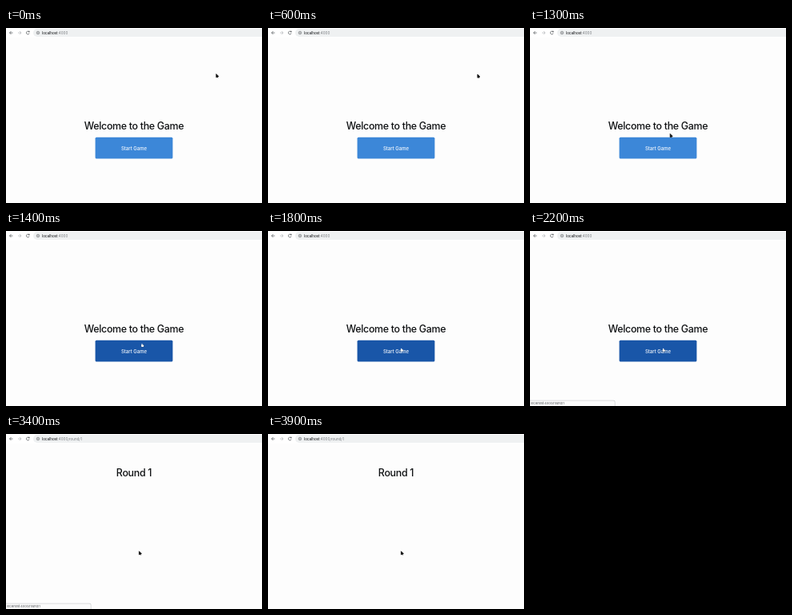
An HTML page with a canvas for the animation above (6.3 s loop, 320 by 219 pixels).

```html
<!DOCTYPE html>
<html lang="en">
<head>
<meta charset="utf-8">
<title>Start Game</title>
<style>
  html, body { margin: 0; width: 100%; height: 100%; overflow: hidden; background: #fdfdfd; }
  canvas { display: block; width: 320px; height: 219px; }
</style>
</head>
<body>
<canvas id="stage"></canvas>
<script>
const WIDTH = 320, HEIGHT = 219, LOOP = 6300, STEP = 100;
const CENTER = WIDTH / 2;
const MOVE = 600, HOVER = 1400, CLICK = 3300, NEXT_PAGE = 3400;
const canvas = document.getElementById('stage');
const ctx = canvas.getContext('2d');
const ratio = window.devicePixelRatio || 1;
canvas.width = WIDTH * ratio;
canvas.height = HEIGHT * ratio;

const clamp = v => Math.max(0, Math.min(1, v));
const mix = (a, b, p) => a + (b - a) * p;
const sigmoid = (time, middle) => 1 / (1 + Math.exp((middle - time) / 100));

// The vertical motion trails the horizontal one, bending the path.
function pointerAt(time) {
  const moving = time >= MOVE ? 1 : 0;
  return {
    x: mix(262.8, 166.4, moving * sigmoid(time, 1070)),
    y: mix(57.6, 146.8, moving * sigmoid(time, 1135))
  };
}

function text(value, x, y, size, color, { weight = 400, align = 'left', spacing = 0 } = {}) {
  ctx.font = `${weight} ${size}px Inter, sans-serif`;
  ctx.letterSpacing = `${spacing}px`;
  ctx.textAlign = align;
  ctx.fillStyle = color;
  ctx.fillText(value, x, y);
  return ctx.measureText(value).width;
}

function box(x, y, w, h, radius, fill) {
  ctx.beginPath();
  ctx.roundRect(x, y, w, h, radius);
  ctx.fillStyle = fill;
  ctx.fill();
}

function ring(x, y, radius, color, width, from = 0, to = Math.PI * 2) {
  ctx.beginPath();
  ctx.arc(x, y, radius, from, to);
  ctx.strokeStyle = color;
  ctx.lineWidth = width;
  ctx.stroke();
}

function navArrow(x, direction, color) {
  const y = 6, reach = 2 * direction;
  ctx.beginPath();
  ctx.moveTo(x - reach, y);
  ctx.lineTo(x + reach, y);
  ctx.moveTo(x, y - 2);
  ctx.lineTo(x + reach, y);
  ctx.lineTo(x, y + 2);
  ctx.strokeStyle = color;
  ctx.lineWidth = 0.7;
  ctx.stroke();
}

function toolbar(path) {
  const dark = '#505357';
  box(0, 0, WIDTH, 12, 0, '#ffffff');
  box(34, 1, WIDTH, 10, 5, '#eff1f2');
  navArrow(6.5, -1, dark);
  navArrow(17, 1, '#b4b6b9');
  ring(27.3, 6, 1.9, dark, 0.7, 0.3, 5.4);
  box(28, 3.7, 1.5, 1.5, 0, dark);
  ring(40, 6, 1.8, dark, 0.55);
  box(39.7, 5, 0.6, 2, 0, dark);
  const hostWidth = text('localhost', 45, 7.7, 4.5, '#25272a', { weight: 500 });
  text(':4000' + path, 45 + hostWidth, 7.7, 4.5, '#777a7e');
}

function heading(value, y) {
  text(value, CENTER, y, 12.4, '#101214', { weight: 500, align: 'center', spacing: -0.3 });
}

function startButton(hovered) {
  box(111.6, 136.7, 96.8, 26.8, 1.5, hovered ? '#1956a8' : '#3c87d8');
  text('Start Game', CENTER, 152.5, 6, '#f6f9fd', { weight: 500, align: 'center' });
}

function statusBar(alpha) {
  if (alpha <= 0) return;
  ctx.save();
  ctx.globalAlpha = alpha;
  box(-2, 211.8, 108.5, 9, 2, '#cfd0d2');
  box(-2, 212.5, 107.8, 9, 1.5, '#fbfbfb');
  text('localhost:4000/round/1', 1, 217.4, 3.8, '#494c50');
  ctx.restore();
}

function arrow({ x, y }) {
  ctx.beginPath();
  ctx.moveTo(x, y);
  ctx.lineTo(x, y + 4.2);
  ctx.lineTo(x + 3, y + 3);
  ctx.closePath();
  ctx.moveTo(x + 1, y + 2.5);
  ctx.lineTo(x + 2, y + 4.8);
  ctx.strokeStyle = '#111111';
  ctx.lineWidth = 0.8;
  ctx.stroke();
  ctx.fillStyle = '#111111';
  ctx.fill();
}

function hand({ x, y }) {
  box(x - 1.2, y + 1.2, 4, 3.2, 1, '#24436d');
  box(x - 0.3, y, 1, 3, 0.5, '#ffffff');
  box(x - 0.8, y + 1.6, 3.2, 2.4, 0.8, '#ffffff');
}

function draw(time) {
  ctx.setTransform(ratio, 0, 0, ratio, 0, 0);
  ctx.fillStyle = '#fdfdfd';
  ctx.fillRect(0, 0, WIDTH, HEIGHT);

  const inRound = time >= NEXT_PAGE;
  const hovered = time >= HOVER && !inRound;
  toolbar(inRound ? '/round/1' : '');

  if (inRound) {
    heading('Round 1', 52.6);
  } else {
    heading('Welcome to the Game', 126.8);
    startButton(hovered);
  }

  statusBar(clamp((time - 1900) / 300) - clamp((time - 3600) / 300));

  const pointer = pointerAt(time);
  if (time >= CLICK && !inRound) {
    ring(pointer.x, pointer.y, 9.5, 'rgba(112,116,122,0.6)', 0.8);
  }
  (hovered ? hand : arrow)(pointer);
}

function frame() {
  const time = performance.now() % LOOP;
  draw(Math.floor(time / STEP) * STEP);
  requestAnimationFrame(frame);
}
frame();
</script>
</body>
</html>
```
